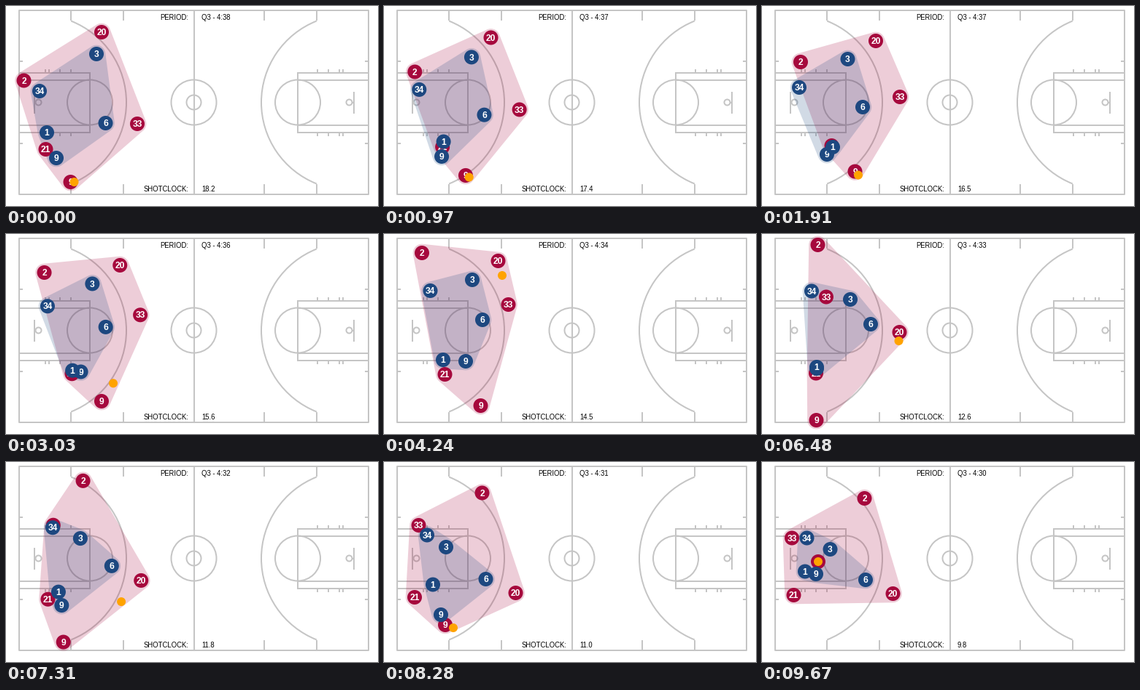
Recreate the animation shown at these times as a matplotlib script. Size 510 by 275 pixels, loop 9820 ms.

```python
import numpy as np
import matplotlib.pyplot as plt
from matplotlib.animation import FuncAnimation
from matplotlib.collections import LineCollection
from matplotlib.patches import Arc, Circle, Polygon

W, H, DPI = 510, 275, 80
LOOP, TICK = 9820, 20
PX = 72 / DPI

RED, BLUE, BALL, LINE = "#a6093d", "#1d4880", "#ffa300", "#c5c5c5"

# Steps at which the tracked positions are pinned
KEYS = np.array([0, 14, 31, 38, 47, 60, 70])

# Jersey number -> positions at the key steps, listed from back to front
RED_TEAM = {
    21: [(54.5, 197), (95.5, 192), (83.5, 193), (82.5, 197), (74, 191.5), (42, 186), (43.5, 183)],
    33: [(180, 162), (189, 125), (170.5, 97), (138, 83), (88, 86.5), (47.5, 87), (41, 104.5)],
    20: [(131, 36), (156, 48), (156.5, 37), (171.5, 66), (188.5, 135), (180.5, 180), (179.5, 181)],
    2: [(24.5, 102.5), (53, 77), (52, 26), (57.5, 14), (76.5, 15), (134.5, 42.5), (140.5, 50)],
    9: [(88.5, 242), (127.5, 227.5), (132.5, 236), (103, 246), (74.5, 256), (84, 224), (77, 137)],
}
BLUE_TEAM = {
    9: [(69, 209), (89, 204), (112, 175), (94.5, 182), (75, 185), (78, 210), (74, 154)],
    34: [(46, 117), (51, 112), (63.5, 78), (65.5, 63), (68, 78.5), (59, 100.5), (61.5, 104.5)],
    6: [(136.5, 161), (138, 139), (135, 118), (140, 114), (149, 124), (139.5, 161), (142, 162)],
    1: [(56, 174), (97, 194), (81, 173), (77, 156.5), (75, 183), (67, 168.5), (59, 150.5)],
    3: [(124, 66), (117.5, 73), (121, 63), (133.5, 68), (121, 90), (85, 117), (93.5, 120)],
}

# Ball: step, red carrier, offset from the carrier
CARRY = [
    (0, 9, 5, 0), (14, 9, 4.5, 5), (21, 9, 5, 4), (25, 33, -4, 8),
    (28, 33, -2, 5), (31, 20, 5.5, 20), (33, 20, 6, 8), (38, 20, 9, 2),
    (47, 20, -1, 12), (52, 20, -4, 10), (56, 9, 10, 2), (60, 9, 11, 4),
    (70, 9, 0, 0),
]

# Start time of every step: (first, last, count)
SPANS = [
    (130, 1110, 8), (1240, 2190, 8), (2320, 3290, 8), (3420, 4370, 8),
    (4510, 5490, 8), (5640, 6630, 8), (6760, 7740, 8), (7870, 8810, 8),
    (8940, 9670, 6),
]
STARTS = np.concatenate([[0]] + [np.linspace(*s) for s in SPANS])
STEPS = np.arange(len(STARTS))


def smooth(values):
    """Monotone cubic through the key values, sampled at every step."""
    h = np.diff(KEYS)
    d = np.diff(values) / h
    m = np.zeros(len(values))
    for i in range(1, len(d)):
        if d[i - 1] * d[i] > 0:
            m[i] = 2 * d[i - 1] * d[i] / (d[i - 1] + d[i])
    m[0], m[-1] = d[0], d[-1]
    i = np.clip(np.searchsorted(KEYS, STEPS, side="right") - 1, 0, len(d) - 1)
    u, w = (STEPS - KEYS[i]) / h[i], h[i]
    v = np.asarray(values)
    return ((1 + 2 * u) * (1 - u) ** 2 * v[i] + u * (1 - u) ** 2 * w * m[i]
            + u * u * (3 - 2 * u) * v[i + 1] + u * u * (u - 1) * w * m[i + 1])


def track(points):
    xs, ys = zip(*points)
    return np.column_stack([smooth(xs), smooth(ys)])


def ball_track(red):
    path = np.zeros((len(STEPS), 2))
    for (k0, a, ax_, ay), (k1, b, bx, by) in zip(CARRY, CARRY[1:]):
        for k in range(k0, k1 + 1):
            u = (k - k0) / (k1 - k0)
            path[k] = (1 - u) * (red[a][k] + (ax_, ay)) + u * (red[b][k] + (bx, by))
    return path


ANGLES = np.linspace(0, 2 * np.pi, 32, endpoint=False)
RING = 12.3 * np.column_stack([np.cos(ANGLES), np.sin(ANGLES)])


def half_hull(points):
    out = []
    for p in points:
        while len(out) > 1:
            (ax_, ay), (bx, by) = out[-2], out[-1]
            if (bx - ax_) * (p[1] - ay) - (by - ay) * (p[0] - ax_) > 0:
                break
            out.pop()
        out.append(p)
    return out[:-1]


def padded_hull(centres):
    """Convex hull of the players with rounded corners."""
    pts = sorted((x, y) for c in centres for x, y in (c + RING).tolist())
    return half_hull(pts) + half_hull(pts[::-1])


fig = plt.figure(figsize=(W / DPI, H / DPI), dpi=DPI, facecolor="white")
ax = fig.add_axes([0, 0, 1, 1])
ax.set_xlim(0, W)
ax.set_ylim(H, 0)
ax.axis("off")


def draw_court():
    left, right, top, bottom, cx, cy = 18, 497, 6, 259, 257.5, 132.5
    lines = [
        [(left, top), (right, top), (right, bottom), (left, bottom), (left, top), (right, top)],
        [(cx, top), (cx, bottom)],
    ]
    rings = [(cx, 31), (cx, 10)]
    sweep = np.degrees(np.arctan2(111.5, 44.5))
    for side in (1, -1):
        def at(x):
            return x if side == 1 else left + right - x

        def seg(x0, y0, x1, y1):
            lines.append([(at(x0), y0), (at(x1), y1)])

        for s in (1, -1):
            edge = cy - s * 126.5
            seg(89, edge, 89, edge + s * 14)
            seg(161, edge, 161, edge + s * 14)
            seg(18, cy - s * 56.5, 23, cy - s * 56.5)
            seg(18, cy - s * 41, 116, cy - s * 41)
            seg(18, cy - s * 31, 115, cy - s * 31)
            for x in (53.5, 58.5, 73.5, 88.5):
                seg(x, cy - s * 41, x, cy - s * 46)
        seg(115, cy - 41, 115, cy + 41)
        seg(38.5, cy - 15, 38.5, cy + 15)
        seg(38.5, cy, 40.5, cy)
        rings += [(at(115), 31), (at(44.5), 4)]
        ax.add_patch(Arc((at(44.5), cy), 241, 241, angle=0 if side == 1 else 180,
                         theta1=-sweep, theta2=sweep, color=LINE, lw=2 * PX, zorder=1))
    ax.add_collection(LineCollection(lines, colors=LINE, linewidths=2 * PX, zorder=1))
    for x, r in rings:
        ax.add_patch(Circle((x, cy), r, fill=False, ec=LINE, lw=2 * PX, zorder=1))


def label(x, y, text, ha):
    return ax.text(x, y, text, ha=ha, va="baseline", color="black",
                   family="Liberation Sans", size=9.5 * PX, zorder=3)


class Team:
    def __init__(self, roster, color, z):
        self.paths = {n: track(p) for n, p in roster.items()}
        self.zone = ax.add_patch(Polygon([(0, 0), (1, 0), (0, 1)], fc=color,
                                         ec="none", alpha=0.2, zorder=2))
        self.marks = {}
        for i, n in enumerate(roster):
            dot = ax.add_patch(Circle((0, 0), 10, fc=color, ec="none", zorder=z + i))
            num = ax.text(0, 0, str(n), color="white", ha="center", va="baseline",
                          family="Liberation Sans", weight="bold", size=12 * PX,
                          zorder=z + i + 0.5)
            self.marks[n] = dot, num

    def place(self, k):
        for n, (dot, num) in self.marks.items():
            x, y = self.paths[n][k]
            dot.center = x, y
            num.set_position((x, y + 4.2))
        self.zone.set_xy(padded_hull([p[k] for p in self.paths.values()]))


draw_court()
reds = Team(RED_TEAM, RED, 10)
blues = Team(BLUE_TEAM, BLUE, 20)
ball_path = ball_track(reds.paths)
ball = ax.add_patch(Circle((0, 0), 6, fc=BALL, ec="none", zorder=30))

label(250, 19, "PERIOD:", "right")
label(250, 255, "SHOTCLOCK:", "right")
period = label(268, 19, "", "left")
shot = label(268, 255, "", "left")


def update(n):
    k = int(np.searchsorted(STARTS, (n + 1) * TICK, side="right")) - 1
    reds.place(k)
    blues.place(k)
    ball.center = ball_path[k]
    period.set_text(f"Q3 - 4:{round(38.2 - 0.12 * k):02d}")
    shot.set_text(f"{18.2 - 0.12 * k:.1f}")
    return []


anim = FuncAnimation(fig, update, frames=LOOP // TICK, interval=TICK,
                     repeat=True, repeat_delay=0, blit=False, cache_frame_data=False)
plt.show()
```
